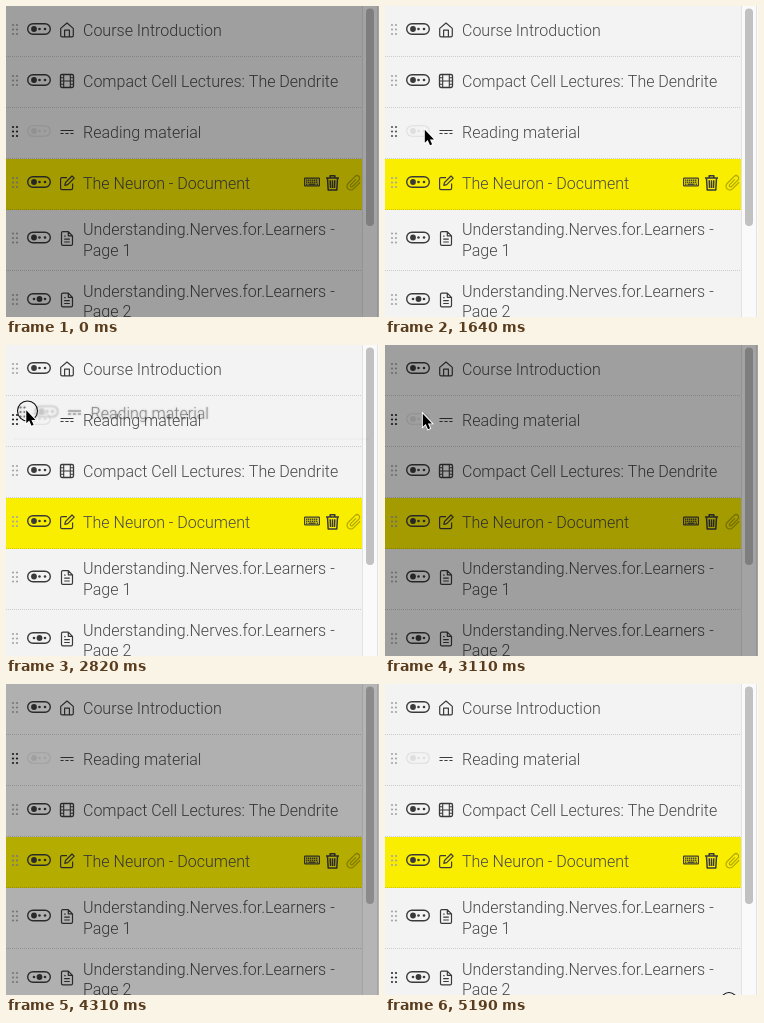
Write an HTML page with a canvas that moves like this. It is 373 px wide and 311 px high and loops after 5290 ms.

```html
<!DOCTYPE html>
<html lang="en">
<head>
<meta charset="utf-8">
<title>Course outline</title>
<style>
html, body { margin: 0; width: 100%; height: 100%; overflow: hidden; background: #f3f3f3; }
canvas { display: block; width: 373px; height: 311px; }
</style>
</head>
<body>
<canvas id="stage"></canvas>
<script>
const W = 373, H = 311, LOOP = 5290;
const INK = '#3a3a3a', PAPER = '#f3f3f3';
const canvas = document.getElementById('stage');
const scale = window.devicePixelRatio || 1;
canvas.width = W * scale;
canvas.height = H * scale;
const c = canvas.getContext('2d');

const FONT = '300 16px Roboto, "Open Sans", sans-serif';

// Pointer: time, x, y, ring radius; a missing position hides it
const pointer = [
  [0], [1190, 225, 266, 0], [1340, 153, 194, 0], [1490, 74, 140, 0],
  [1640, 39, 123, 0], [1780, 31, 124, 0], [1930, 14.5, 124, 0],
  [2080, 11, 123, 0], [2220, 11, 123, 7], [2370, 11, 121, 10],
  [2520, 15, 90, 10], [2670, 18.5, 65, 10], [2820, 19.5, 64.5, 10],
  [3110, 37, 68, 0], [3260, 221.5, 123.5, 0], [3410], [5190, 342, 315, 8]
];
const shade = [[0, .35], [750, 0], [3110, .35], [4310, .28], [4460, 0]];
const readingGrip = [[0, 1], [890, 0], [1640, .6], [1780, 1], [4600, 0]];
const pageOneGrip = [[0, 0], [1340, .6], [1490, 0]];
const pageTwoGrip = [[0, 0], [5040, .5], [5190, .9]];

function at(keys, t) {
  let found = keys[0];
  for (const key of keys) if (key[0] <= t) found = key;
  return found;
}

function place(x, y, draw) {
  c.save();
  c.translate(x, y);
  draw();
  c.restore();
}

function stroke(path, width = 1.2) {
  c.lineWidth = width;
  c.stroke(new Path2D(path));
}

function dot(x, y, r) {
  c.beginPath();
  c.arc(x, y, r, 0, Math.PI * 2);
  c.fill();
}

function rounded(x, y, w, h, r) {
  c.beginPath();
  c.roundRect(x, y, w, h, r);
}

function grip(y, level) {
  const v = Math.round(165 - 130 * level);
  c.fillStyle = `rgb(${v},${v},${v})`;
  for (const x of [7, 11])
    for (const dy of [-4.5, 0, 4.5]) dot(x, y + dy, 1.1);
}

function toggle(y, active, faint) {
  c.save();
  c.strokeStyle = c.fillStyle = faint ? '#dedede' : INK;
  c.lineWidth = faint ? 1.1 : 1.4;
  rounded(21.7, y - 5.3, 22.6, 10.6, 5.3);
  c.stroke();
  [28, 33.5, 39].forEach((x, i) => dot(x, y, i === active ? 2.9 : 1.3));
  c.restore();
}

// Icons are drawn around their own centre
const icons = {
  home() {
    stroke('M-6.3 -1.6 L0 -7 L6.3 -1.6 V5.4 Q6.3 6.8 4.9 6.8 H-4.9 Q-6.3 6.8 -6.3 5.4 Z M-2.4 6.8 V.2 H2.4 V6.8');
  },
  film() {
    rounded(-6.5, -6.5, 13, 13, 1.4);
    c.lineWidth = 1.3;
    c.stroke();
    stroke('M-3.3 -6.5 V6.5 M3.3 -6.5 V6.5 M-6.5 0 H6.5 M-6.5 -3.3 H-3.3 M-6.5 3.3 H-3.3 M3.3 -3.3 H6.5 M3.3 3.3 H6.5', 1.1);
  },
  divider() {
    stroke('M-6.5 -1.5 H6.5 M-6.5 1.5 H-3.4 M-1.6 1.5 H1.6 M3.4 1.5 H6.5', 1.2);
  },
  edit() {
    stroke('M0 -5.4 H-5 Q-6.4 -5.4 -6.4 -4 V5.2 Q-6.4 6.6 -5 6.6 H4.2 Q5.6 6.6 5.6 5.2 V.4 M-2.2 2.4 L-1.5 -.5 L5 -7 L7.2 -4.8 L.7 1.7 Z');
  },
  doc() {
    stroke('M1.3 -6.9 H-4.2 Q-5.5 -6.9 -5.5 -5.6 V5.6 Q-5.5 6.9 -4.2 6.9 H4.2 Q5.5 6.9 5.5 5.6 V-2.7 Z M1.3 -6.9 V-2.7 H5.5 M-2.8 .6 H2.8 M-2.8 3.5 H2.8 M-2.8 -2.3 H-1.4');
  },
  keyboard() {
    rounded(-7.4, -3.9, 14.8, 7.8, .6);
    c.lineWidth = 1.2;
    c.stroke();
    c.fillStyle = INK;
    for (const y of [-2.5, -.5])
      for (let x = -6; x < 5.5; x += 2) c.fillRect(x, y, 1.5, 1.4);
    c.fillRect(-6, 1.5, 1.5, 1.4);
    c.fillRect(-3.6, 1.5, 7.2, 1.4);
    c.fillRect(4.5, 1.5, 1.5, 1.4);
  },
  trash() {
    stroke('M-6.5 -5 H6.5 M-2.3 -5 V-7.2 H2.3 V-5', 1.6);
    stroke('M-5 -4.7 L-4.3 7 H4.3 L5 -4.7 M-2.3 -2.8 L-2 5 M0 -2.8 V5 M2.3 -2.8 L2 5', 1.5);
  },
  clip() {
    c.rotate(Math.PI / 4);
    c.strokeStyle = 'rgba(60,55,0,.38)';
    stroke('M3.8 -4.8 V4.5 A3.8 3.8 0 0 1 -3.8 4.5 V-5.5 A2.6 2.6 0 0 1 1.4 -5.5 V3.5 A1.3 1.3 0 0 1 -1.2 3.5 V-4');
  }
};

function icon(name, x, y) {
  place(x, y, () => {
    c.strokeStyle = INK;
    c.lineJoin = 'round';
    icons[name]();
  });
}

function label(text, y) {
  c.fillStyle = '#484848';
  c.fillText(text, 77, y);
}

// y is the centre line of the grip and toggle
function row(y, name, lines, level = 0, active = 0, faint = false) {
  grip(y, level);
  toggle(y - .5, active, faint);
  icon(name, 61, y + .5);
  const base = lines.length > 1 ? y - 3 : y + 6.5;
  lines.forEach((text, i) => label(text, base + i * 20.5));
}

function reading(y, level) {
  row(y, 'divider', ['Reading material'], level, 0, true);
}

function separators() {
  c.save();
  c.strokeStyle = 'rgba(0,0,0,.16)';
  c.lineWidth = 1;
  c.setLineDash([1, 1]);
  for (const y of [50.5, 101.5, 152.5, 203.5, 264.5]) {
    c.beginPath();
    c.moveTo(0, y);
    c.lineTo(356, y);
    c.stroke();
  }
  c.restore();
}

function scrollbar() {
  c.fillStyle = '#fafafa';
  c.fillRect(356, 0, 17, H);
  c.fillStyle = '#e2e2e2';
  c.fillRect(356, 0, 1, H);
  c.fillRect(371, 0, 1, H);
  c.fillStyle = '#c1c1c1';
  rounded(360, 2.5, 8, 217.5, 4);
  c.fill();
}

// Translucent copy of the row, carried with a soft shadow
function ghost(x, y) {
  place(x, y, () => {
    c.globalAlpha = .5;
    c.shadowColor = 'rgba(0,0,0,.6)';
    c.shadowBlur = 2 * scale;
    c.fillStyle = 'rgba(0,0,0,.06)';
    c.fillRect(0, 152, 356, 1);
    reading(125.5, 1);
  });
}

function arrow(x, y) {
  place(x, y, () => {
    const shape = new Path2D('M.8 .8 V13.8 L3.7 11.1 L6 16.2 L8.1 15.3 L5.9 10.4 H10 Z');
    c.fillStyle = '#000';
    c.strokeStyle = '#fff';
    c.lineWidth = 1.8;
    c.stroke(shape);
    c.fill(shape);
  });
}

function drawPointer([, x, y, r]) {
  if (x === undefined) return;
  if (r) {
    c.strokeStyle = '#111';
    c.lineWidth = 1.1;
    c.beginPath();
    c.arc(x + 2, y + 1.5, r, 0, Math.PI * 2);
    c.stroke();
  }
  arrow(x, y);
}

function draw(t) {
  const swapped = t >= 2820;
  const hand = at(pointer, t);
  const level = at(readingGrip, t)[1];

  c.setTransform(scale, 0, 0, scale, 0, 0);
  c.font = FONT;
  c.textBaseline = 'alphabetic';
  c.fillStyle = PAPER;
  c.fillRect(0, 0, W, H);
  c.fillStyle = '#faee00';
  c.fillRect(0, 153, 356, 51);
  separators();

  row(23.5, 'home', ['Course Introduction']);
  row(swapped ? 125.5 : 74.5, 'film', ['Compact Cell Lectures: The Dendrite']);
  reading(swapped ? 74.5 : 125.5, level);
  row(176.5, 'edit', ['The Neuron - Document']);
  icon('keyboard', 306, 176);
  icon('trash', 326.5, 177);
  icon('clip', 348, 177);
  const book = 'Understanding.Nerves.for.Learners -';
  row(232, 'doc', [book, 'Page 1'], at(pageOneGrip, t)[1]);
  row(293.5, 'doc', [book, 'Page 2'], at(pageTwoGrip, t)[1], 1);
  scrollbar();

  // The copy keeps its offset from where it was grabbed
  if (t >= 2370 && t < 3110) ghost(hand[1] - 12, hand[2] - 123);
  c.fillStyle = `rgba(0,0,0,${at(shade, t)[1]})`;
  c.fillRect(0, 0, W, H);
  drawPointer(hand);
}

const start = performance.now();
function tick() {
  draw((performance.now() - start) % LOOP);
  requestAnimationFrame(tick);
}
tick();
</script>
</body>
</html>
```
